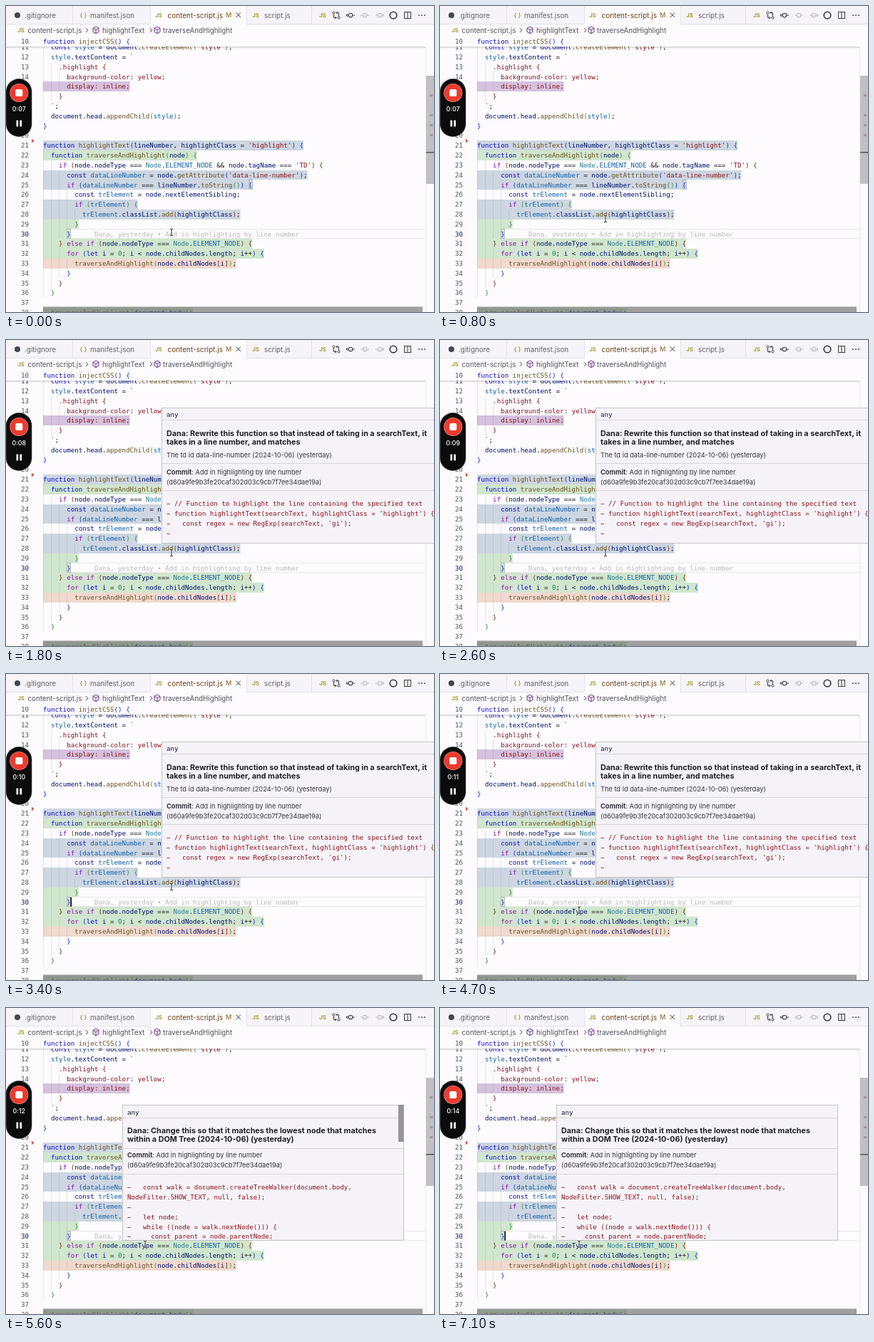
Write an HTML page with a canvas that moves like this. It is 600 px wide and 430 px high and loops after 7500 ms.

```html
<!DOCTYPE html>
<html lang="en">
<head>
<meta charset="utf-8">
<title>Code hover</title>
<style>
html, body { margin: 0; width: 100%; height: 100%; overflow: hidden; background: #fdfbfe; }
canvas { display: block; width: 600px; height: 430px; }
</style>
</head>
<body>
<canvas id="stage"></canvas>
<script>
const LOOP = 7500, STEP = 100;
const W = 600, H = 430;
const MONO = '"DejaVu Sans Mono", monospace';
const UI = 'Inter, "Open Sans", sans-serif';
const CODE_SIZE = 9.185, CHAR = 5.53, LEFT = 52, ROW = 13.81;
const AUTHOR = 'Dana';
const COMMIT = '(d60a9fe9b3fe20caf302d03c9cb7f7ee34dae19a)';

const PAPER = '#fdfbfe', RED = '#8a1018';
const BLUE = '#cdd6e1', GREEN = '#d1e6ce', PURPLE = '#d5c2dd', PEACH = '#f0d9cf';
const FIRST = 10;
// Each row: code, optional band colour
const SOURCE = [
  ["function injectCSS() {"],
  ["  const style = document.createElement('style');"],
  ["  style.textContent = `"],
  ["    .highlight {"],
  ["      background-color: yellow;"],
  ["      display: inline;", PURPLE],
  ["    }"],
  ["  `;"],
  ["  document.head.appendChild(style);"],
  ["}"],
  [""],
  ["function highlightText(lineNumber, highlightClass = 'highlight') {", BLUE],
  ["  function traverseAndHighlight(node) {", GREEN],
  ["    if (node.nodeType === Node.ELEMENT_NODE && node.tagName === 'TD') {"],
  ["      const dataLineNumber = node.getAttribute('data-line-number');", BLUE],
  ["      if (dataLineNumber === lineNumber.toString()) {", BLUE],
  ["        const trElement = node.nextElementSibling;"],
  ["        if (trElement) {", BLUE],
  ["          trElement.classList.add(highlightClass);", BLUE],
  ["        }", GREEN],
  ["      }", GREEN],
  ["    } else if (node.nodeType === Node.ELEMENT_NODE) {", GREEN],
  ["      for (let i = 0; i < node.childNodes.length; i++) {", GREEN],
  ["        traverseAndHighlight(node.childNodes[i]);", PEACH],
  ["      }"],
  ["    }"],
  ["  }"],
  [""],
  ["  traverseAndHighlight(document.body);", GREEN]
];

const canvas = document.getElementById('stage');
const ctx = canvas.getContext('2d');
const dpr = window.devicePixelRatio || 1;
canvas.width = W * dpr;
canvas.height = H * dpr;

const rowY = n => 196 + ROW * (n - 21);
const clamp = v => Math.max(0, Math.min(1, v));
const ease = v => { v = clamp(v); return v * v * (3 - 2 * v); };

function rect(x, y, w, h, color) {
  ctx.fillStyle = color;
  ctx.fillRect(x, y, w, h);
}

function frame(x, y, w, h, color) {
  ctx.strokeStyle = color;
  ctx.lineWidth = 1;
  ctx.strokeRect(x, y, w, h);
}

function pill(x, y, w, h, r, color) {
  ctx.fillStyle = color;
  ctx.beginPath();
  ctx.roundRect(x, y, w, h, r);
  ctx.fill();
}

function circle(x, y, r, fill, stroke, width = 1) {
  ctx.beginPath();
  ctx.arc(x, y, r, 0, Math.PI * 2);
  if (fill) { ctx.fillStyle = fill; ctx.fill(); }
  if (stroke) { ctx.strokeStyle = stroke; ctx.lineWidth = width; ctx.stroke(); }
}

function path(points, color, width = 1) {
  ctx.strokeStyle = color;
  ctx.lineWidth = width;
  ctx.beginPath();
  points.forEach(([x, y], i) => i ? ctx.lineTo(x, y) : ctx.moveTo(x, y));
  ctx.stroke();
}

// y is the middle of the capitals
function text(str, x, y, size, color, { font = UI, weight = 400, align = 'left' } = {}) {
  ctx.font = `${weight} ${size}px ${font}`;
  ctx.textAlign = align;
  ctx.fillStyle = color;
  ctx.fillText(str, x, y + size * 0.36);
  return ctx.measureText(str).width;
}

const code = (str, x, y, color, align) => text(str, x, y, CODE_SIZE, color, { font: MONO, align });

function wordColor(word, prev, next) {
  if (/^(function|const|let)$/.test(word)) return '#0808d8';
  if (/^(if|else|for)$/.test(word)) return '#8a0fb0';
  if (next === '(') return '#6b5320';
  if (word === 'Node') return '#267f99';
  if (/^(ELEMENT_NODE|dataLineNumber|trElement)$/.test(word)) return '#0f62ae';
  if (word === 'style' && prev !== '.') return '#0f62ae';
  return '#001070';
}

function tokenize() {
  const pairs = ['#0a2fd8', '#3c8c34', '#6f3010'];
  let depth = 0, template = false;
  return SOURCE.map(([line]) => {
    const tokens = [];
    for (const m of line.matchAll(/'[^']*'|[A-Za-z_]\w*|\d+|\S/g)) {
      const str = m[0];
      let color = '#1a1a1a';
      if (str === '`') { template = !template; color = RED; }
      else if (template || str[0] === "'") color = RED;
      else if ('({['.includes(str)) color = pairs[depth++ % 3];
      else if (')}]'.includes(str)) color = pairs[--depth % 3];
      else if (/^\d/.test(str)) color = '#098658';
      else if (/^\w/.test(str)) color = wordColor(str, line[m.index - 1], line[m.index + str.length]);
      tokens.push({ str, x: LEFT + m.index * CHAR, color });
    }
    return tokens;
  });
}

const TOKENS = tokenize();

function drawRow(n, y = rowY(n)) {
  const [line, band] = SOURCE[n - FIRST];
  const top = Math.round(y - ROW / 2), height = Math.round(y + ROW / 2) - top;
  if (band) rect(LEFT, top, line.length * CHAR, height, band);
  for (let col = 0; col < line.search(/\S/); col += 2) {
    rect(Math.round(LEFT + col * CHAR), top, 1, height, 'rgba(40,30,60,.1)');
  }
  code(String(n), 32, y, n === 30 ? '#0b1660' : '#4f5663', 'right');
  TOKENS[n - FIRST].forEach(k => code(k.str, k.x, y, k.color));
}

function bracketBox(n, col) {
  const x = Math.round(LEFT + col * CHAR) + 0.5, y = Math.round(rowY(n) - 7) + 0.5;
  frame(x, y, 5, 13, '#b3bcc2');
}

function drawEditor(caretOn) {
  rect(0, 0, W, H, PAPER);
  const y = rowY(30);
  rect(LEFT, Math.round(y - 7), 536, 1, '#ebe8ed');
  rect(LEFT, Math.round(y + 6), 536, 1, '#ebe8ed');
  for (let n = 11; n < FIRST + SOURCE.length; n++) drawRow(n);
  bracketBox(25, 52);
  bracketBox(30, 6);
  code(`${AUTHOR}, yesterday • Add in highlighting by line number`, LEFT + 13 * CHAR, y, '#bab8bc');
  if (caretOn) rect(90.5, y - 6.5, 1.5, 13, '#000');

  // deleted-line marker
  ctx.fillStyle = '#d9534a';
  ctx.beginPath();
  ctx.moveTo(36, 186.5);
  ctx.lineTo(39.5, 189.5);
  ctx.lineTo(36, 192.5);
  ctx.fill();

  // horizontal scrollbar
  rect(LEFT, 422.5, 532, 8, 'rgba(100,100,100,.6)');

  // pinned first row
  rect(0, 43, W, 14, PAPER);
  drawRow(10, 50);
  const shade = ctx.createLinearGradient(0, 57, 0, 60);
  shade.addColorStop(0, 'rgba(0,0,0,.18)');
  shade.addColorStop(1, 'rgba(0,0,0,0)');
  rect(0, 57, 588, 3, shade);

  // overview ruler
  rect(588, 57, 1, H - 57, '#ece9ee');
  rect(589, 98, 11, 152, '#c1bfc3');
  for (const my of [124, 152, 166, 180]) rect(594, my, 4, 3, '#aa9698');
  rect(589, 205, 11, 1.5, '#555');
}

function cube(x, y) {
  const c = '#652d90';
  path([[x, y - 5], [x + 4, y - 2.7], [x + 4, y + 2.3], [x, y + 4.7], [x - 4, y + 2.3], [x - 4, y - 2.7], [x, y - 5]], c);
  path([[x - 4, y - 2.7], [x, y - 0.5], [x + 4, y - 2.7]], c);
  path([[x, y - 0.5], [x, y + 4.7]], c);
}

const jsIcon = (x, y) => text('JS', x, y, 7.8, '#a39e2a', { weight: 700, align: 'center' });

// arrow: -1 left, 1 right, 0 none
function commitIcon(x, color, arrow) {
  circle(x, 13, 2.8, null, color, 1.1);
  path([[x - 6, 13], [x - 2.8, 13]], color);
  path([[x + 2.8, 13], [x + 6, 13]], color);
  if (arrow) path([[x + 4 * arrow, 10.8], [x + 6.2 * arrow, 13], [x + 4 * arrow, 15.2]], color);
}

function drawTabs() {
  const ink = '#3b3b3b', faint = '#b9b7bb', dim = '#625f67', edge = '#e4e1e7';
  rect(0, 0, W, 25, '#f7f4f9');
  rect(0, 25, W, 1, edge);
  rect(202, 0, 135, 26, PAPER);
  for (const x of [93, 202, 337, 428]) rect(x, 0, 1, 25, edge);

  circle(16, 13, 4, '#41484d');
  text('.gitignore', 26, 13, 9.9, dim);
  text('{ }', 108.5, 12.5, 8.5, '#a39e2a', { weight: 600, align: 'center' });
  text('manifest.json', 118, 13, 9.9, dim);
  jsIcon(214, 13);
  text('content-script.js', 226.5, 13, 10, '#6c4010');
  text('M', 308, 13, 9.2, '#8a5c1a');
  path([[322.5, 9.5], [329, 16]], ink);
  path([[329, 9.5], [322.5, 16]], ink);
  jsIcon(350, 13);
  text('script.js', 362, 13, 9.9, dim);
  jsIcon(444, 13);

  // compare
  circle(459.5, 9.5, 1.6, null, ink);
  circle(466.5, 16.5, 1.6, null, ink);
  path([[459.5, 11.2], [459.5, 16.5], [463, 16.5]], ink);
  path([[466.5, 14.8], [466.5, 9.5], [463, 9.5]], ink);
  path([[461.2, 14.6], [463, 16.5], [461.2, 18.4]], ink);
  path([[464.8, 7.6], [463, 9.5], [464.8, 11.4]], ink);
  commitIcon(483, ink, -1);
  commitIcon(503, faint, 0);
  commitIcon(524, faint, 1);
  circle(543, 13, 4.8, null, '#333', 1.6);
  // split
  frame(558.5, 8.5, 9, 9, ink);
  path([[563, 8.5], [563, 17.5]], ink);
  for (const x of [579, 583, 587]) circle(x, 13, 0.9, ink);
}

function drawBreadcrumbs() {
  const ink = '#55525a', y = 34;
  rect(0, 26, W, 17, PAPER);
  jsIcon(21, y);
  text('content-script.js', 30.5, y, 9.8, ink);
  path([[112, 31], [115, 34], [112, 37]], ink);
  cube(126, y);
  text('highlightText', 135, y, 9.8, ink);
  path([[202, 31], [205, 34], [202, 37]], ink);
  cube(212, y);
  text('traverseAndHighlight', 220, y, 9.8, ink);
}

function drawRecorder(seconds) {
  pill(-0.3, 102, 36.8, 82, 18.2, '#8d8b90');
  pill(0.3, 102.6, 35.6, 80.8, 17.7, '#0b0b0c');
  circle(18.3, 122, 13, '#f3a79f');
  circle(18.3, 122, 12.4, '#ee3a2c');
  pill(13.3, 117, 10, 10, 1.8, '#fff');
  text(`0:${String(seconds).padStart(2, '0')}`, 18.3, 145.3, 8.8, '#fff', { weight: 500, align: 'center' });
  pill(14.5, 160.5, 2.7, 9, 0.8, '#fff');
  pill(19.4, 160.5, 2.7, 9, 0.8, '#fff');
}

function panel(x, y, w, h, rules) {
  rect(x, y, w, h, '#c6c3c8');
  rect(x + 1, y + 1, w - 2, h - 2, '#f6f3f8');
  for (const r of rules) rect(x + 1, r, w - 2, 1, '#dad7dc');
}

function hoverText(x, anyY, titleY, title, commitY) {
  const ink = '#35333a', size = 9.25;
  code('any', x, anyY, '#14143c');
  title.forEach((line, i) => text(line, x, titleY + i * 12.5, 10.75, '#222025', { weight: 700 }));
  const w = text('Commit', x, commitY, size, ink, { weight: 700 });
  text(': Add in highlighting by line number', x + w, commitY, size, ink);
  text(COMMIT, x, commitY + 14, size, ink);
}

function diff(lines, x, y) {
  lines.forEach((line, i) => code(line, x, y + i * ROW, RED));
}

function drawFirstHover() {
  panel(218, 95, 384, 191, [112, 173, 211]);
  hoverText(225, 104.5, 131, [
    `${AUTHOR}: Rewrite this function so that instead of taking in a searchText, it`,
    'takes in a line number, and matches'
  ], 185.3);
  text('The td id data-line-number (2024-10-06) (yesterday)', 225, 161.7, 9.25, '#35333a');
  diff([
    '− // Function to highlight the line containing the specified text',
    "− function highlightText(searchText, highlightClass = 'highlight') {",
    "−   const regex = new RegExp(searchText, 'gi');",
    '−'
  ], 225, 230);
}

function drawSecondHover(barAlpha) {
  panel(163, 136, 395, 191, [154, 197, 233]);
  hoverText(170, 146.3, 172, [
    `${AUTHOR}: Change this so that it matches the lowest node that matches`,
    'within a DOM Tree (2024-10-06) (yesterday)'
  ], 207);
  diff([
    '−   const walk = document.createTreeWalker(document.body,',
    'NodeFilter.SHOW_TEXT, null, false);',
    '−',
    '−   let node;',
    '−   while ((node = walk.nextNode())) {',
    '−     const parent = node.parentNode;'
  ], 170, 252);
  rect(550, 136, 7.5, 52, `rgba(140,138,142,${0.9 * barAlpha})`);
}

function drawPointer(t) {
  const up = ease((t - 100) / 500), away = ease((t - 4200) / 450);
  const x = 232 - 37 * away;
  const y = 318 - 19 * up + 33 * away;
  const shape = (color, width) => {
    path([[x, y - 4], [x, y + 4]], color, width);
    for (const s of [-1, 1]) path([[x - 2, y + 5 * s], [x, y + 4 * s], [x + 2, y + 5 * s]], color, width);
  };
  shape('rgba(255,255,255,.8)', 2.4);
  shape('#222', 1);
}

function draw(t) {
  ctx.setTransform(dpr, 0, 0, dpr, 0, 0);
  const blink = t % 1000;
  drawEditor(blink >= 100 && blink < 600);
  drawBreadcrumbs();
  drawTabs();
  drawRecorder(Math.max(7, 7 + Math.floor((t - 100) / 1000)));
  if (t >= 1000 && t < 4900) drawFirstHover();
  if (t >= 5000) drawSecondHover(1 - clamp((t - 5600) / 700));
  drawPointer(t);
}

const start = performance.now();
function tick() {
  const t = (performance.now() - start) % LOOP;
  draw(Math.floor(t / STEP) * STEP);
  requestAnimationFrame(tick);
}
tick();
</script>
</body>
</html>
```
